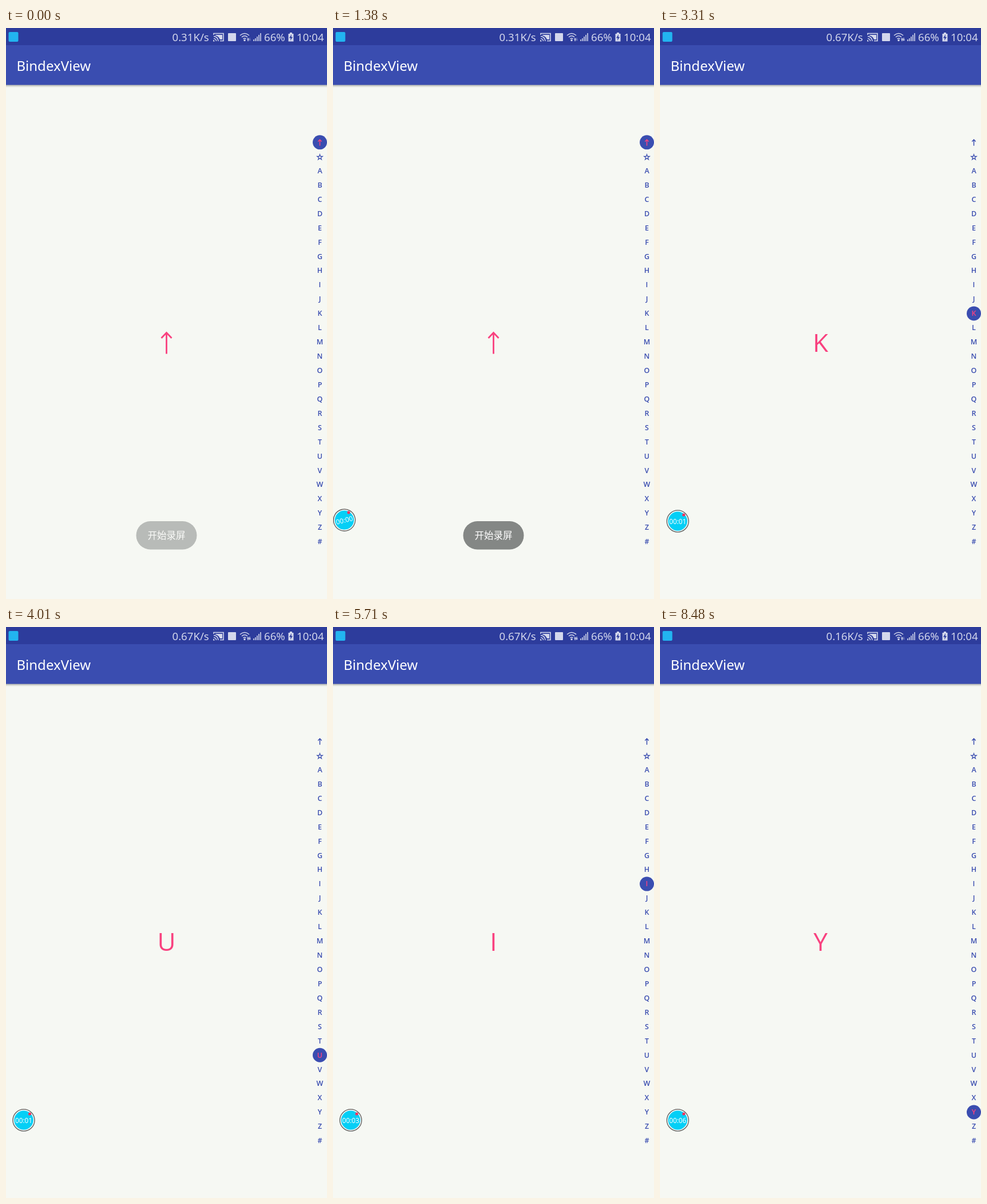
Write an HTML page that moves like this. It is 561 by 998 pixels and loops after 8.62 s.

```html
<!DOCTYPE html>
<html lang="zh">
<head>
<meta charset="utf-8">
<title>BindexView</title>
<style>
  html, body { margin: 0; width: 100%; height: 100%; overflow: hidden; background: #f6f8f3; }
  svg { display: block; font-family: "Noto Sans", "Open Sans", sans-serif; }
  .status { fill: #d3d7ec; font-size: 18.6px; }
  .line { fill: none; stroke: #d3d7ec; stroke-width: 1.6; }
  .mid { text-anchor: middle; }
  #index, #big { font-family: "Open Sans", "Noto Sans", sans-serif; }
  #index { color: #3a4db0; font-size: 12.5px; font-weight: 600; }
  #index .on, #big { color: #f9417f; }
  #big { font-size: 44px; }
  .glyph text { fill: currentColor; text-anchor: middle; }
  .glyph path { fill: none; stroke: currentColor; }
  #toast text { font: 16.5px "Noto Sans CJK SC", "Noto Sans CJK", sans-serif; fill: #fff; }
</style>
</head>
<body>
<svg width="561" height="998" viewBox="0 0 561 998">
  <defs>
    <linearGradient id="shade" x2="0" y2="1">
      <stop stop-color="#b0b2aa"/><stop offset="1" stop-color="#f6f8f3"/>
    </linearGradient>
  </defs>
  <rect width="561" height="998" fill="#f6f8f3"/>
  <rect y="99" width="561" height="5" fill="url(#shade)"/>
  <rect width="561" height="99.500" fill="#3a4db0"/>
  <rect width="561" height="30" fill="#2d3c9c"/>
  <text x="18.500" y="75" font-size="24" fill="#fff">BindexView</text>

  <rect x="4.500" y="7" width="17" height="17" rx="2" fill="#22b4f0"/>
  <text id="speed" class="status" x="290.500" y="23"></text>
  <path class="line" d="M363 12V9.500H380V22.500H374M363 14.500A8.500 8.500 0 0 1 371 23M363 18.500A4.500 4.500 0 0 1 367.500 23"/>
  <path fill="#d3d7ec" d="M366 12H378V20H374A11 11 0 0 0 366 13ZM362 21A2 2 0 0 1 364.500 23.500H362Z"/>
  <rect x="388" y="9" width="14" height="14" rx="1" fill="#d3d7ec"/>
  <path class="line" d="M409 13Q417 6 425 13M412 16Q417 11.500 422 16M414.500 19Q417 17 419.500 19"/>
  <circle cx="417" cy="21.500" r="1.700" fill="#d3d7ec"/>
  <path id="up" fill="#d3d7ec" d="M421 20L423 17L425 20H423.800V23H422.200V20Z"/>
  <path id="down" fill="#d3d7ec" d="M424 20H425.300V17H426.700V20H428L426 23Z"/>
  <path class="line" d="M433 23V20M436 23V18M439 23V15M442 23V12M445 23V9"/>
  <text class="status" x="451" y="23">66%</text>
  <path fill="#d3d7ec" d="M496 8H500V10H502.500V23.500H493.500V10H496Z"/>
  <path fill="#2d3c9c" d="M499 11L495 17.500H497.600L497 22L501 15.800H498.500Z"/>
  <text class="status" x="508" y="23">10:04</text>

  <circle id="mark" cx="548.500" r="12.500" fill="#3a4db0"/>
  <g id="index"></g>
  <g id="big"></g>

  <g id="toast">
    <rect x="227.500" y="862" width="106" height="49.500" rx="24.750" fill="#848785"/>
    <text class="mid" x="280.500" y="893">开始录屏</text>
  </g>
  <g id="dock">
    <circle cx="-4" cy="853.500" r="21.500" fill="#cfd2d0"/>
    <text class="mid" transform="translate(11 858) rotate(-65)" font-size="11.800" fill="#fff">00:00</text>
  </g>
  <g id="ball">
    <circle cx="31" cy="862" r="19" fill="#fff" stroke="#6d706e" stroke-width="1.600"/>
    <circle cx="31" cy="862" r="16.700" fill="#04cff6"/>
    <text id="clock" class="mid" x="31" y="866.500" font-size="11.800" fill="#fff"></text>
    <circle cx="41.500" cy="851" r="2.600" fill="#f0355f"/>
  </g>
</svg>
<script>
const LOOP = 8620, ROW = 24.93, TOP = 199.8;
const labels = [..."↑☆ABCDEFGHIJKLMNOPQRSTUVWXYZ#"];
const $ = id => document.getElementById(id);
const clamp = v => Math.max(0, Math.min(1, v));
const ease = v => v * v * (3 - 2 * v);

// [time, row]: a tap, a drag down, a drag up, then taps
const drag = [[0, "↑"], [1850, "↑"], [1851, "☆"], [2640, "☆"], [3330, "K"], [4390, "#"],
  [4540, "#"], [5070, "T"], [6260, "↑"], [6910, "↑"], [7060, "E"], [7480, "E"], [7481, "K"],
  [7960, "K"], [8080, "Q"], [8340, "Q"], [8341, "Y"], [LOOP, "Y"]]
  .map(([time, label]) => [time, labels.indexOf(label)]);
const ticks = [3100, 4200, 5300, 6400, 7480, 8480];

function starPath(r) {
  const points = Array.from({ length: 10 }, (_, i) => {
    const a = i * Math.PI / 5, d = i % 2 ? r * 0.382 : r;
    return `${(Math.sin(a) * d).toFixed(2)} ${(-Math.cos(a) * d).toFixed(2)}`;
  });
  return `M${points.join("L")}Z`;
}

function glyph(label, x, y, big) {
  let body;
  if (label === "↑") {
    body = big
      ? '<path stroke-width="2.800" d="M0 19V-18M-9 -8.500L0 -18L9 -8.500"/>'
      : '<path stroke-width="1.500" d="M0 6V-4.500M-3.200 -1.300L0 -4.700L3.200 -1.300"/>';
  } else if (label === "☆") {
    body = `<path transform="translate(0 ${big ? 1.5 : 1.2})" stroke-width="${big ? 1.8 : 1.2}" d="${starPath(big ? 18 : 5)}"/>`;
  } else {
    body = `<text y="${big ? 15.5 : 4.3}">${label}</text>`;
  }
  return `<g class="glyph" transform="translate(${x} ${y})">${body}</g>`;
}

$("index").innerHTML = labels.map((s, i) => glyph(s, 548.5, TOP + i * ROW)).join("");
$("big").innerHTML = labels.map(s => glyph(s, 280.5, 550.5, true)).join("");
const rows = [...$("index").children], bigs = [...$("big").children];

function selectedAt(t) {
  const i = drag.findIndex(k => k[0] > t);
  const [t0, a] = drag[i - 1], [t1, b] = drag[i];
  return Math.round(a + (b - a) * (t - t0) / (t1 - t0));
}

function draw(t) {
  const selected = selectedAt(t);
  rows.forEach((row, i) => row.classList.toggle("on", i === selected));
  bigs.forEach((big, i) => big.style.display = i === selected ? "" : "none");
  $("mark").setAttribute("cy", TOP + selected * ROW);

  $("speed").textContent = (t < 3000 ? "0.31" : t < 6910 ? "0.67" : "0.16") + "K/s";
  const idle = t > 1810 && t < 3000;
  const receiving = (t > 3000 && t < 4500) || (t > 5400 && t < 6910);
  $("up").setAttribute("opacity", idle ? 0.4 : 1);
  $("down").setAttribute("opacity", receiving ? 1 : 0.4);

  $("toast").setAttribute("opacity", 0.53 + 0.47 * clamp(t / 250) - clamp((t - 2690) / 400));
  const docked = ease(clamp((t - 200) / 300));
  const out = ease(clamp((t - 960) / 600));
  $("dock").setAttribute("transform", `translate(${-20 + 20 * docked} 0)`);
  $("dock").setAttribute("opacity", docked * (1 - clamp(out * 3)));
  $("ball").setAttribute("transform",
    `translate(${-52 * (1 - out)} ${-9 * (1 - out)}) rotate(${-65 * (1 - out)} 31 862)`);
  $("clock").textContent = "00:0" + ticks.filter(k => k <= t).length;
}

function frame(now) {
  draw(now % LOOP);
  requestAnimationFrame(frame);
}
draw(0);
requestAnimationFrame(frame);
</script>
</body>
</html>
```
